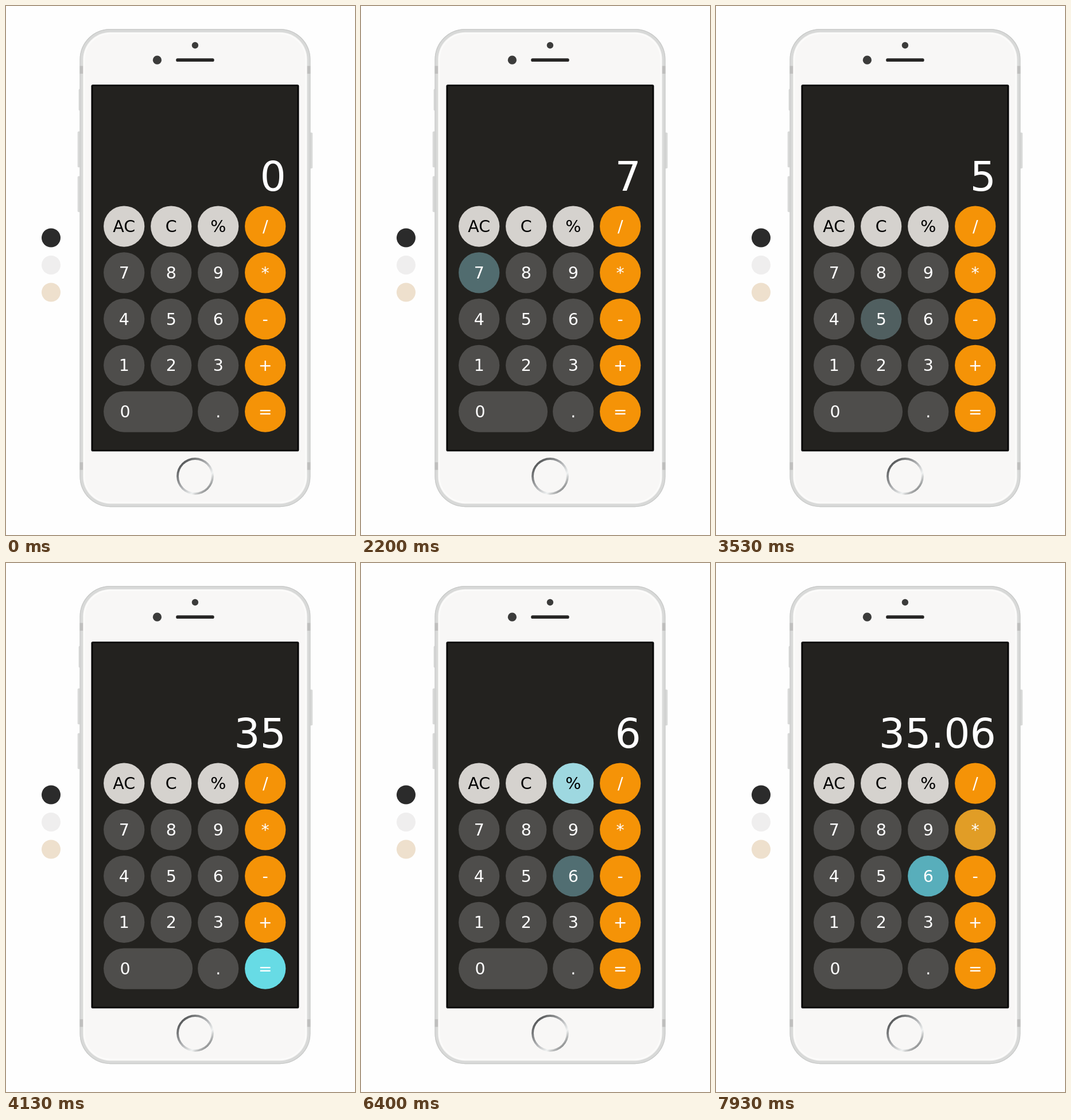
Write an HTML page with a canvas that moves like this. It is 608 px wide and 922 px high and loops after 8 s.

```html
<!DOCTYPE html>
<html lang="en">
<head>
<meta charset="utf-8">
<title>Calculator</title>
<style>
  html, body { margin: 0; width: 100%; height: 100%; overflow: hidden; background: #fefefe; }
  canvas { display: block; }
</style>
</head>
<body>
<canvas id="stage" width="608" height="922"></canvas>
<script>
const ctx = document.getElementById('stage').getContext('2d');
const LOOP = 8000;
const FADE = 600;
const SCALE = 0.95;
const FONT = '"DejaVu Sans", sans-serif';

const LIGHT = [213, 210, 206];
const GREY = [78, 77, 75];
const ORANGE = [245, 147, 7];
const HOVER = [93, 224, 245];

const ROWS = ['AC C % /', '7 8 9 *', '4 5 6 -', '1 2 3 +', '0 _ . ='].map(r => r.split(' '));

// key, pointer enters, pointer leaves
const HOVERS = [
  ['AC', 700, 800], ['7', 870, 1909], ['*', 2230, 2610], ['5', 2740, 3194],
  ['3', 3430, 3480], ['=', 3720, 4290], ['+', 4400, 4870], ['6', 4985, 6118],
  ['%', 6238, 6830], ['*', 7000, 7585], ['6', 7700, LOOP]
];

// time, text on the display
const READOUT = [
  [0, '0'], [1650, '7'], [3070, '5'], [4060, '35'],
  [5190, '6'], [6650, '0.06'], [7320, '35.06']
];

// cubic-bezier(.25, .1, .25, 1)
function ease(x) {
  if (x <= 0) return 0;
  if (x >= 1) return 1;
  let lo = 0, hi = 1;
  for (let i = 0; i < 24; i++) {
    const s = (lo + hi) / 2, r = 1 - s;
    if (0.75 * s * r * r + 0.75 * s * s * r + s * s * s < x) lo = s; else hi = s;
  }
  const s = lo, r = 1 - s;
  return 0.3 * s * r * r + 3 * s * s * r + s * s * s;
}

function glow(t, enter, leave) {
  if (t < leave) return ease((t - enter) / FADE);
  const peak = ease((leave - enter) / FADE);
  return peak * (1 - ease((t - leave) / (FADE * peak)));
}

function keyGlow(key, t) {
  return HOVERS.reduce((g, [k, a, b]) => k === key ? Math.max(g, glow(t, a, b)) : g, 0);
}

function mix(a, b, f) {
  return `rgb(${a.map((v, i) => Math.round(v + (b[i] - v) * f)).join(',')})`;
}

function box(x, y, w, h, r, fill) {
  ctx.beginPath();
  ctx.roundRect(x, y, w, h, r);
  ctx.fillStyle = fill;
  ctx.fill();
}

function disc(x, y, r, fill) {
  ctx.beginPath();
  ctx.arc(x, y, r, 0, Math.PI * 2);
  ctx.fillStyle = fill;
  ctx.fill();
}

function label(text, x, y, size, align, fill) {
  ctx.font = `${size}px ${FONT}`;
  ctx.textAlign = align;
  ctx.fillStyle = fill;
  ctx.fillText(text, x, y);
}

function drawSwatches() {
  ['#2b2b2b', '#efeeee', '#eee0cd'].forEach((c, i) => disc(78.5, 404 + i * 47.5, 16.5, c));
}

function drawPhone() {
  const shell = '#d8d9d8';
  ctx.save();
  ctx.translate(128.5, 40);
  ctx.scale(SCALE, SCALE);

  box(-2, 110, 4, 40, [2, 0, 0, 2], shell);
  box(-4, 188, 5, 66, [2, 0, 0, 2], shell);
  box(-4, 270, 5, 66, [2, 0, 0, 2], shell);
  box(422, 190, 5, 66, [0, 2, 2, 0], shell);

  box(0, 0, 423, 877, 56, shell);
  ctx.lineWidth = 1.2;
  ctx.strokeStyle = '#c8c9c8';
  ctx.beginPath();
  ctx.roundRect(0.6, 0.6, 421.8, 875.8, 55.4);
  ctx.stroke();
  for (const y of [68, 795]) box(0, y, 423, 14, 0, '#bfbfbe');

  box(6, 6, 411, 865, 50, '#f8f7f6');
  ctx.lineWidth = 1.5;
  ctx.strokeStyle = '#fdfdfc';
  ctx.beginPath();
  ctx.roundRect(8.5, 8.5, 406, 860, 47.5);
  ctx.stroke();

  disc(211.5, 30, 6, '#3c3c3b');
  disc(142, 57, 8, '#3c3c3b');
  box(176.5, 54, 70, 6, 3, '#262524');

  const ring = ctx.createLinearGradient(177.5, 786.5, 245.5, 854.5);
  ring.addColorStop(0, '#303233');
  ring.addColorStop(0.5, '#b5b7b9');
  ring.addColorStop(0.69, '#f0f2f2');
  ring.addColorStop(1, '#303233');
  disc(211.5, 820.5, 34, ring);
  disc(211.5, 820.5, 30, '#f8f7f6');

  box(21, 102, 381, 673, 3, '#060606');
  box(24, 105, 375, 667, 0, '#23221f');
  ctx.restore();
}

function drawKeys(t) {
  const size = 75 * SCALE, r = size / 2;
  ROWS.forEach((row, j) => row.forEach((key, i) => {
    if (key === '_') return;
    const cx = 205.7 + i * 82, cy = 384 + j * 80.75;
    const base = i === 3 ? ORANGE : j === 0 ? LIGHT : GREY;
    const wide = key === '0';
    box(cx - r, cy - r, wide ? 155 : size, size, r, mix(base, HOVER, keyGlow(key, t)));
    label(key, wide ? 207.5 : cx, cy + 10.2, 30 * SCALE, 'center', j === 0 && i < 3 ? '#000' : '#fff');
  }));
}

function draw(t) {
  ctx.fillStyle = '#fefefe';
  ctx.fillRect(0, 0, 608, 922);
  drawSwatches();
  drawPhone();
  const shown = READOUT.filter(([at]) => at <= t).pop()[1];
  label(shown, 487.8, 321.5, 75 * SCALE, 'right', '#fff');
  drawKeys(t);
}

const start = performance.now();
function tick() {
  draw((performance.now() - start) % LOOP);
  requestAnimationFrame(tick);
}
tick();
</script>
</body>
</html>
```
